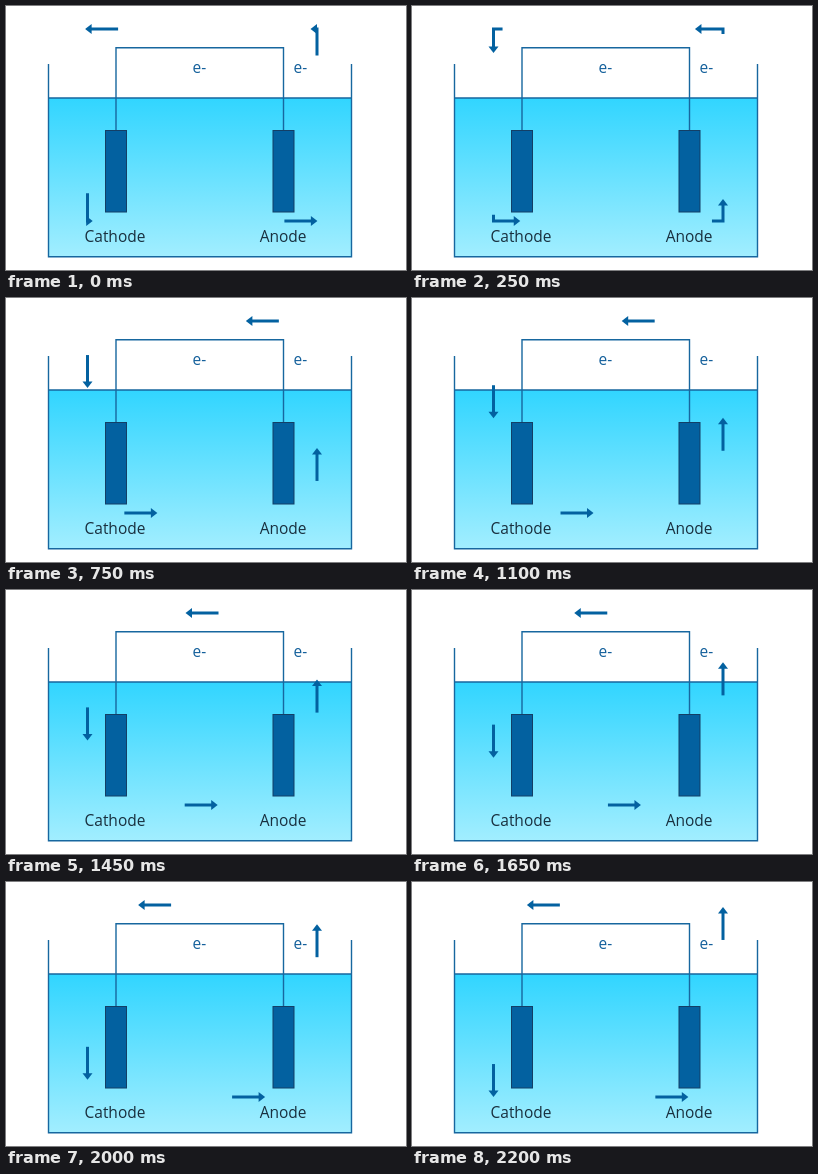
Animation of 400x264 px, one loop 2250 ms. Source, as an HTML page:

```html
<!DOCTYPE html>
<html lang="en">
<head>
<meta charset="utf-8">
<title>Electrolytic cell</title>
<style>
  html, body { margin: 0; width: 100%; height: 100%; overflow: hidden; background: #fff; }
  svg { display: block; }
  text { font: 15.5px "Open Sans", "Noto Sans", sans-serif; fill: #19303f; }
  .charge { fill: #14609b; }
  .line { fill: none; stroke: #17679f; stroke-width: 1.4; }
  .plate { fill: #0361a0; stroke: #133f66; }
  .arrow { fill: none; stroke: #0361a0; stroke-width: 3; marker-end: url(#head); }
</style>
</head>
<body>
<svg width="400" height="264" viewBox="0 0 400 264">
  <defs>
    <linearGradient id="water" x2="0" y2="1">
      <stop stop-color="#31d5ff"/>
      <stop offset="1" stop-color="#a2eeff"/>
    </linearGradient>
    <marker id="head" markerUnits="userSpaceOnUse" orient="auto" overflow="visible">
      <path d="M-1.5 -5L5 0L-1.5 5Z" fill="#0361a0"/>
    </marker>
  </defs>
  <rect x="42.5" y="92" width="303" height="159" fill="url(#water)"/>
  <path class="line" d="M42.5 58V250.8H345.5V58M42.5 92H345.5M110 125V41.7H277.5V125"/>
  <rect class="plate" x="99.5" y="124.5" width="21" height="81.5"/>
  <rect class="plate" x="267" y="124.5" width="21" height="81.5"/>
  <text x="78.5" y="236">Cathode</text>
  <text x="253.7" y="236">Anode</text>
  <text class="charge" x="186.5" y="67">e-</text>
  <text class="charge" x="287.5" y="67">e-</text>
</svg>
<script>
const LOOP = 2250, STEP = 50, SPEED = 0.0862, SHAFT = 28;

// Each arrow turns left at a corner; start is its head's distance past that corner.
const arrows = [
  { x: 81.5, y: 23, turn: 90, start: -2.6 },
  { x: 81.5, y: 215, turn: 0, start: 0.2 },
  { x: 311, y: 215, turn: -90, start: -4.6 },
  { x: 311, y: 23, turn: 180, start: 1.5 }
];

const svg = document.querySelector("svg");
for (const a of arrows) {
  a.path = document.createElementNS(svg.namespaceURI, "path");
  a.path.setAttribute("class", "arrow");
  a.path.setAttribute("transform", `translate(${a.x} ${a.y}) rotate(${a.turn})`);
  svg.append(a.path);
}

// Local frame: the arrow arrives along +y and leaves along +x.
function shape(head) {
  const tail = head - SHAFT;
  if (head < 0) return `M0 ${tail}V${head}`;
  if (tail < 0) return `M0 ${tail}V0H${head}`;
  return `M${tail} 0H${head}`;
}

const origin = performance.now();
function draw() {
  const elapsed = (performance.now() - origin) % LOOP;
  const time = Math.floor(elapsed / STEP) * STEP;
  for (const a of arrows) a.path.setAttribute("d", shape(a.start + time * SPEED));
  requestAnimationFrame(draw);
}
draw();
</script>
</body>
</html>
```
